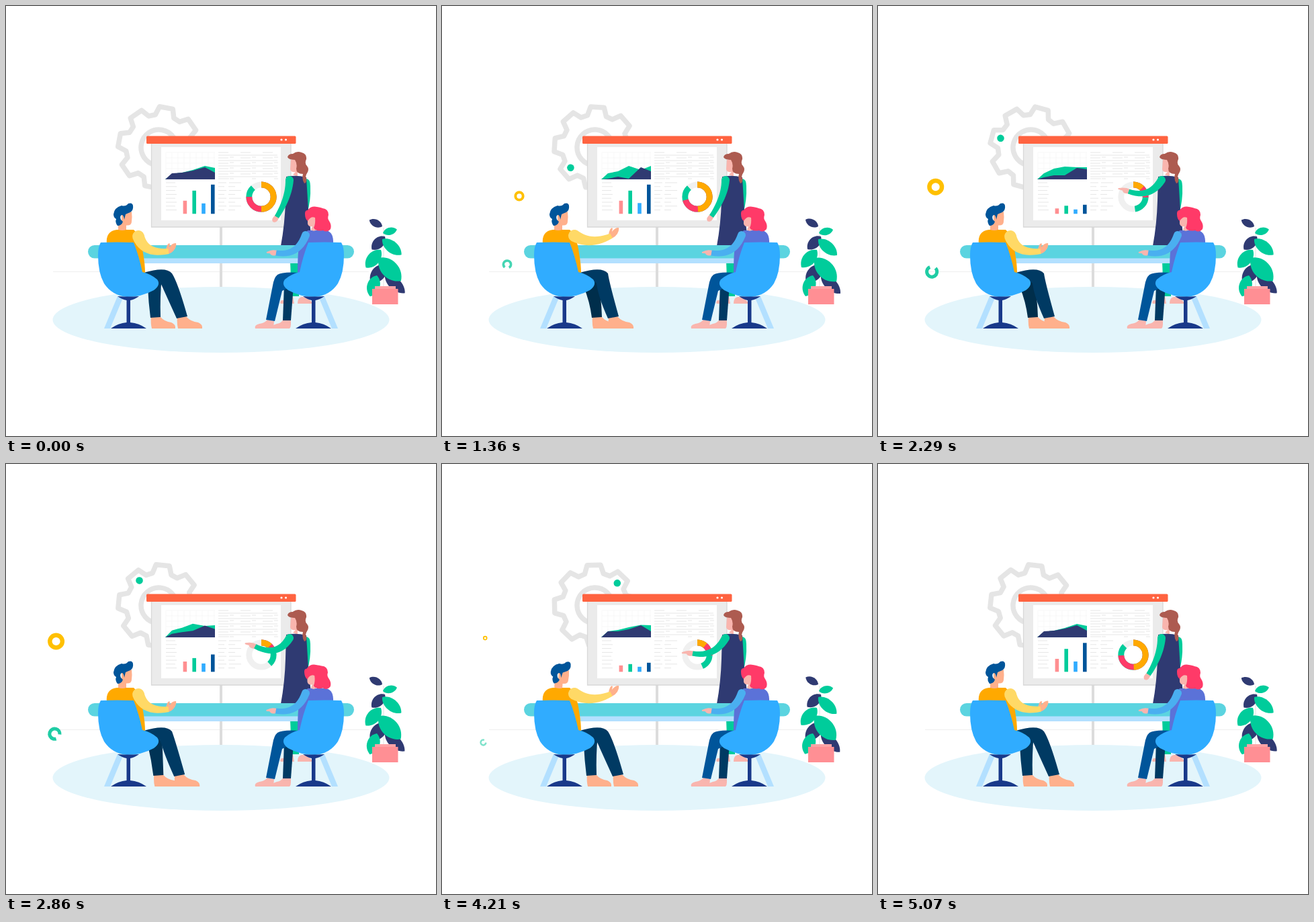
Animation of 640x640 px, one loop 5140 ms. Source, as an HTML page:

```html
<!DOCTYPE html>
<html lang="en">
<head>
<meta charset="utf-8">
<title>Team presentation</title>
<style>
  html, body { margin: 0; width: 100%; height: 100%; overflow: hidden; background: #fff; }
  svg { display: block; width: 100%; height: 100%; }
  .skin { fill: #ffb08c; }
  .rose { fill: #f9b5ae; }
  .navy { fill: #2f3a72; }
  .green { fill: #00cc9b; }
  .pale { fill: #b3e0ff; }
</style>
</head>
<body>
<svg viewBox="0 0 640 640">
  <defs>
    <g id="chair">
      <path fill="#30acff" d="M141 352Q165 351 190 352Q198 372 203 396Q216 399 225 407Q231 415 220 423Q202 433 180 433Q158 431 146 413Q137 397 137 371Q137 358 141 352Z"/>
      <path fill="#19398a" d="M166 432Q182 433 198 432Q191 437 185 438V471Q198 472 209 480H156Q167 472 179.500 471V438Q173 437 166 432Z"/>
    </g>
    <path id="tableLeg" class="pale" d="M166 432H175L155 480H146Z"/>
  </defs>

  <path d="M70 395.500H540" stroke="#efefef"/>
  <ellipse cx="320" cy="467" rx="250.500" ry="49" fill="#e3f5fb"/>

  <g id="gear" fill="none" stroke="#e5e5e5" stroke-width="7.500" stroke-linejoin="round">
    <path id="teeth"/>
    <circle r="26.500"/>
    <circle class="green" cx="32.400" cy="34.100" r="5.300" stroke="none"/>
  </g>

  <path d="M320 329V418" stroke="#dcdcdc" stroke-width="4"/>
  <path d="M216.500 204H424V329H216.500Z" fill="#ebebeb" stroke="#d8d8d8" stroke-width="1.300"/>
  <path d="M231 210H409V319H231Z" fill="#fff"/>
  <rect x="209" y="193.500" width="222.500" height="11.500" rx="1.500" fill="#ff6340"/>
  <g fill="#fff"><circle cx="410" cy="199" r="1.600"/><circle cx="416.500" cy="199" r="1.600"/></g>
  <path id="grid" fill="none" stroke="#f5f5f5" stroke-width=".7"/>
  <path id="rules" fill="none" stroke="#e6e6e6"/>
  <path id="greenArea" class="green"/>
  <path id="navyArea" class="navy"/>
  <g id="bars"></g>
  <g id="donut" fill="none" stroke-width="8.800" transform="translate(380 284) rotate(-90)">
    <circle r="18.200" stroke="#f0f0f0"/>
  </g>

  <!-- presenter -->
  <path class="green" d="M423 380H436V432H425ZM445 257Q453 256 453 268Q454 290 448 309Z"/>
  <path class="rose" d="M427 432Q421 438 410 438Q407 441 409 443H429ZM434 443Q434 434 440 433Q449 432 457 443Z"/>
  <path class="rose" d="M424 229H434V254L427 251L431 247Q424 248 423 243Z"/>
  <path class="navy" d="M417 254Q432 251 447 255L450 305L456 357H409Q415 325 416 290Z"/>
  <path fill="#ad5b50" d="M419 225Q420 220 427 220Q433 215 440 218Q448 220 447 228Q444 234 448 238Q452 243 448 249Q445 253 447 257Q448 263 444 264Q440 258 442 250Q432 250 432 242Q434 235 430 229Q421 229 419 225Z"/>
  <path id="pointHand" class="rose"/>
  <path id="pointArm" class="green"/>

  <!-- table -->
  <path class="pale" d="M150 374H490V383H150Z"/>
  <rect x="122" y="356" width="396" height="19.500" rx="9.750" fill="#5bd4e0"/>
  <use href="#tableLeg"/>
  <use href="#tableLeg" transform="translate(640) scale(-1 1)"/>

  <!-- plant -->
  <g id="leaves"><path d="M562 330V420" stroke="#e2e2e2"/></g>
  <path fill="#ff8f94" d="M545 421H583.500V444H545Z"/>
  <path fill="#ffa3a6" d="M549 417H580V421H549Z"/>

  <!-- seated man -->
  <g class="skin"><path id="farFoot"/><path id="nearFoot"/></g>
  <path id="farLeg"/>
  <path id="nearLeg" fill="#003a63"/>
  <path fill="#ffa900" d="M150 354Q148 335 165 333H190Q201 343 204 368Q207 384 207 398H160Z"/>
  <g id="manHead">
    <path class="skin" d="M167 322H172V311L187 306Q188 314 187 321Q187 327 179 326.500V333Q173 335 167 333Z"/>
    <path fill="#00559a" d="M160 310Q161 300 172 297Q178 299 182 294Q188 292 189 297Q190 304 185 307Q180 309 178 310L176 318Q175 310 172 311Q169 313 171 318L174 321Q172 327 166 327Q162 322 164 317Q160 315 160 310Z"/>
  </g>
  <path id="manHand" class="skin" d="M-3 4Q-5 -3 -2 -9Q0 -13 2 -11L1 -6Q6 -13 11 -12Q12 -8 9 -3Q5 3 -1 4Z"/>
  <path id="manArm" fill="#ffd966"/>
  <use href="#chair"/>

  <!-- seated woman -->
  <path class="rose" d="M389 467L399 469Q399 475 397 480H371Q369 475 377 473Q385 472 389 467ZM413 466H424V474Q424 478 422 480H397Q395 475 403 473Q410 472 413 466Z"/>
  <path fill="#003a63" d="M414 415H428L424 468H412Z"/>
  <path fill="#00559a" d="M440 397Q411 395 404 400Q399 404 397 416L387 467L400 469L411 424L440 410Z"/>
  <path fill="#5b72d8" d="M449 334H477Q488 337 487 354L470 398H434Q434 366 437 350Z"/>
  <g id="womanHead">
    <path class="rose" d="M449 315Q454 308 463 314L461 334Q457 336 454 333L456 328Q450 329 449 324Z"/>
    <path fill="#ff3a68" d="M449 320Q445 317 445 309Q445 304 449 304Q454 297 463 299Q469 300 471 301Q480 302 480 311Q478 316 481 320Q485 326 483 332Q478 338 472 334Q461 336 458 330Q461 324 460 315Q454 312 449 320Z"/>
  </g>
  <path id="womanHand" class="rose"/>
  <path id="womanArm" fill="#4aaff0"/>
  <use href="#chair" transform="translate(640) scale(-1 1)"/>

  <!-- floating rings -->
  <g fill="none" stroke-width=".5">
    <circle id="yellowRing" r=".72" stroke="#ffc000"/>
    <circle id="greenRing" r=".75" stroke="#1fcca4" pathLength="360" stroke-dasharray="285 75"/>
  </g>
</svg>

<script>
const LOOP = 5140, STEPS = 72;
const KEYS = [0, 11, 19, 32, 49, 59, STEPS];
const $ = id => document.getElementById(id);
const set = (el, attrs) => { for (const name in attrs) el.setAttribute(name, attrs[name]); };
const add = (parent, tag, attrs) => {
  const el = document.createElementNS('http://www.w3.org/2000/svg', tag);
  set(el, attrs);
  return parent.appendChild(el);
};
const path = (id, d) => set($(id), { d });
const place = (id, transform) => set($(id), { transform });
const mix = (a, b, u) => Array.isArray(a) ? a.map((v, i) => mix(v, b[i], u)) : a + (b - a) * u;

// Eased value between the six poses of the loop
function track(step, poses) {
  const i = KEYS.findIndex(key => key > step) - 1;
  const u = (step - KEYS[i]) / (KEYS[i + 1] - KEYS[i]);
  return mix(poses[i], poses[(i + 1) % poses.length], u * u * (3 - 2 * u));
}

// Tapered limb along a quadratic curve
function limb([x0, y0, x1, y1, x2, y2], startWidth, endWidth) {
  const left = [], right = [];
  for (let u = 0; u <= 1.001; u += 1 / 12) {
    const v = 1 - u;
    const x = v * v * x0 + 2 * u * v * x1 + u * u * x2;
    const y = v * v * y0 + 2 * u * v * y1 + u * u * y2;
    const a = Math.atan2(mix(y1 - y0, y2 - y1, u), mix(x1 - x0, x2 - x1, u));
    const w = mix(startWidth, endWidth, u) / 2;
    left.push([x + w * Math.sin(a), y - w * Math.cos(a)]);
    right.unshift([x - w * Math.sin(a), y + w * Math.cos(a)]);
  }
  const r = startWidth / 2;
  return `M${left.join('L')}L${right.join('L')}A${r} ${r} 0 0 1 ${left[0]}Z`;
}

const hand = length => `M-3 -3.500L4 -4Q8 -4 ${length} -1Q${length + 1} 1 ${length - 2} 1L9 1Q8 4 3 4L-3 3Z`;

// Static parts
const polar = (r, deg) => [r * Math.sin(deg * Math.PI / 180), -r * Math.cos(deg * Math.PI / 180)];
const teeth = [];
for (let a = 0; a < 360; a += 45)
  teeth.push(polar(49, a - 16.6), polar(60.8, a - 9.5), polar(60.8, a + 9.5), polar(49, a + 16.6));
path('teeth', `M${teeth.join('L')}Z`);

let grid = '', rules = '';
for (let x = 238; x <= 311; x += 9) grid += `M${x} 218V258`;
for (let y = 218; y <= 258; y += 8) grid += `M238 ${y}H311`;
for (let y = 222; y < 256; y += 8) {
  rules += `M316 ${y}H404`;
  for (const x of [316, 349, 382]) rules += `M${x} ${y - 4}h15M${x + 17} ${y + 3}h6`;
}
rules += 'M316 257H332';
for (let i = 0; i < 8; i++) {
  const y = 263 + i * 5.8;
  rules += `M238 ${y}h${i % 2 ? 16 : 14}`;
  rules += i % 2 ? `M316 ${y}h9m6 0h10` : `M316 ${y}h12m4 0h18`;
}
path('grid', grid);
path('rules', rules);

const bars = ['#ff8f91', '#00cc9b', '#30acff', '#00559a'].map((fill, i) =>
  add($('bars'), 'rect', { x: 263.6 + i * 13.8, width: 5.6, fill }));
const slices = ['#00cc9b', '#ff3a68', '#ffa900'].map(stroke =>
  add($('donut'), 'circle', { r: 18.2, stroke, pathLength: 360 })).reverse();

// Each leaf: base, tip, half width, colour class
const leaves = [
  [560, 328, 541, 318, 7, 'navy'], [561, 338, 582, 333, 7, 'green'],
  [564, 343, 544, 362, 10, 'navy'], [560, 347, 588, 371, 11, 'green'],
  [566, 385, 542, 411, 13, 'navy'], [558, 363, 535, 389, 12, 'green'],
  [564, 400, 593, 428, 11, 'navy'], [555, 375, 587, 410, 16, 'green'],
  [552, 401, 541, 432, 12, 'green']
].map(([x1, y1, x2, y2, w, cls]) => {
  const dx = x2 - x1, dy = y2 - y1, len = Math.hypot(dx, dy);
  const at = (u, side) => [x1 + dx * u - side * w * dy / len, y1 + dy * u + side * w * dx / len];
  const d = `M${x1} ${y1}C${at(.2, 1)} ${at(.75, 1.1)} ${x2} ${y2}C${at(.75, -1.1)} ${at(.2, -1)} ${x1} ${y1}Z`;
  return { x1, y1, el: add($('leaves'), 'path', { class: cls, d }) };
});

function drawBoard(step) {
  const area = poses => {
    const y = track(step, poses);
    return 'M237 258' + [247, 262, 278, 296, 311].map((x, i) => `L${x} ${y[i]}`).join('') + 'V258Z';
  };
  path('greenArea', area([
    [250, 248, 244, 238, 241], [247, 246, 237, 243.5, 239], [249, 246, 238, 244, 238],
    [249, 242, 239, 240, 240], [246, 246, 236.5, 242, 240], [249, 247, 243, 239.5, 240]]));
  path('navyArea', area([
    [249, 248, 245, 240, 248], [251, 247, 247, 240, 246], [257, 254, 257, 240, 246],
    [255, 252, 252, 241, 243], [250, 248, 244, 240, 249], [249, 249, 246, 240, 249]]));

  track(step, [
    [19.5, 34.5, 15.5, 43.5], [11, 12, 9, 14.5], [19.5, 34.5, 16, 43.5],
    [8, 12, 6.5, 13.5], [24, 30.5, 19.5, 40.5], [9.5, 11.5, 7.5, 13.5]
  ].map(p => p)).forEach((height, i) => set(bars[i], { y: 309.3 - height, height }));

  track(step, [
    [180, 270, 318], [157, 231, 278], [177, 255, 318], [45, 93, 172], [42, 62, 97], [40, 93, 157]
  ]).forEach((end, i) => set(slices[i], { 'stroke-dasharray': `${end} 360` }));
}

function drawPeople(step) {
  const [ex, ey, wx, wy, angle, finger] = track(step, [
    [421, 285, 403, 314, 125, 9], [421, 285, 403, 314, 125, 9], [421, 284, 401, 313, 125, 9],
    [405, 287, 373, 276, 195, 16], [404, 290, 368, 266, 197, 15], [406, 288, 373, 282, 183, 16]]);
  path('pointArm', limb([422, 259, ex, ey, wx, wy], 12, 7));
  set($('pointHand'), { d: hand(finger), transform: `translate(${wx} ${wy}) rotate(${angle}) scale(1 -1)` });

  const lift = track(step, [0, .35, 1, 0, 0, 1]);
  const arm = mix([197, 343, 206, 370, 242, 365], [197, 342, 222, 357, 252, 342], lift);
  path('manArm', limb(arm, 18, 8));
  place('manHand', `translate(${arm[4]} ${arm[5]})`);
  place('manHead', `rotate(${track(step, [0, 0, 0, 0, 0, 4])} 173 335)`);

  const tuck = track(step, [0, 0, 1, 1, 0, 0]);
  const far = mix(215, 223, tuck), near = mix(270, 263, tuck);
  const foot = (x, w) => `M${x} 462h13Q${x + 20} 470 ${x + w - 6} 471Q${x + w + 1} 474 ${x + w} 480H${x + 1}Q${x - 1} 472 ${x} 462Z`;
  path('farFoot', foot(far + 1, 36));
  path('nearFoot', foot(near - 15, 37));
  path('farLeg', `M207 399L232 403Q${far + 14} 432 ${far + 15} 463L${far} 464Q${far - 3} 440 211 418Z`);
  set($('farLeg'), { fill: `rgb(0,${58 - 12 * tuck},${97 - 22 * tuck})` });
  path('nearLeg', `M205 397Q238 387 247 398Q${near - 14} 412 ${near} 462L${near - 16} 465Q${near - 31} 432 230 412L207 408Z`);

  const reach = track(step, [0, -1, -1, 0, -1, -1]);
  path('womanArm', limb([446, 341, 434, 373, 402 + reach, 367.5], 12, 8));
  set($('womanHand'), { d: hand(14), transform: `translate(${402 + reach} 367.500) rotate(182) scale(1 -1)` });
  place('womanHead', `rotate(${track(step, [0, 0, 0, 0, -5, 0])} 460 335)`);
}

function drawRings(step) {
  const yellow = Math.max(0, 13.2 - .0185 * (step - 36) ** 2);
  const drift = 123 * Math.max(0, 1 - step / 64) ** 2.5;
  place('yellowRing', `translate(${64 + drift} ${259 + .47 * drift}) scale(${yellow})`);

  const green = Math.max(0, 10.3 - .0098 * (step - 36) ** 2);
  const x = 60 + (8.4 - .122 * step) ** 2, y = 366.5 + 1.02 * step - .0035 * step ** 2;
  set($('greenRing'), {
    transform: `translate(${x} ${y}) rotate(${14.8 * step - 125}) scale(${green})`,
    opacity: Math.min(1, green / 9)
  });
}

function render(now) {
  const step = Math.min(STEPS - 1, Math.floor((now % LOOP + 5) / LOOP * STEPS));
  place('gear', `translate(227.500 210.500) rotate(${10.5 + step * 4.375})`);
  const sway = track(step, [1, -1, 0, 1, 0, -1]);
  leaves.forEach(({ x1, y1, el }) => set(el, { transform: `rotate(${-1.5 * sway} ${x1} ${y1})` }));
  drawBoard(step);
  drawPeople(step);
  drawRings(step);
  requestAnimationFrame(render);
}
const start = performance.now();
requestAnimationFrame(function first() { render(0); });
render = (draw => () => draw(performance.now() - start))(render);
</script>
</body>
</html>
```
